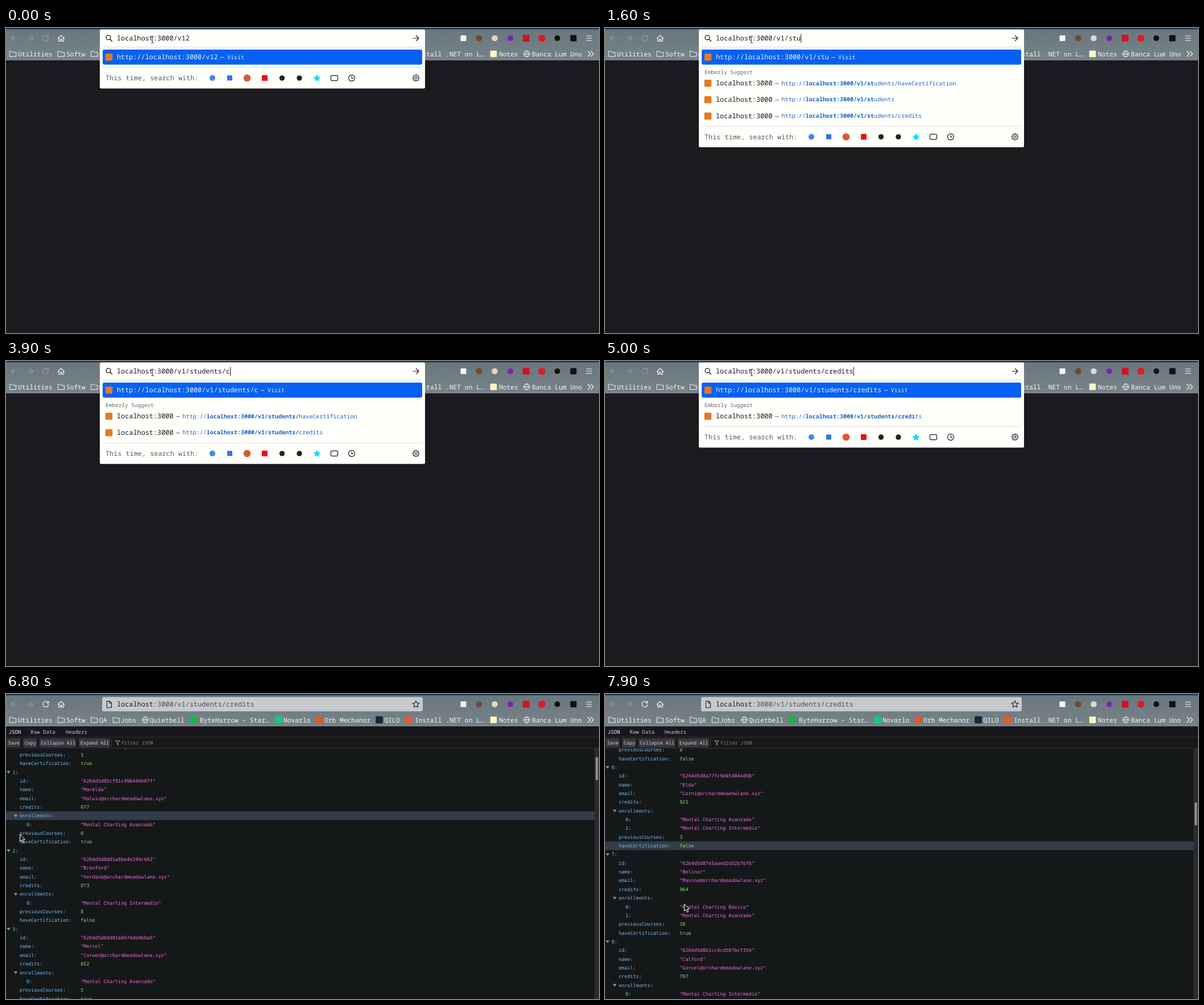
An HTML page for the animation above (8 s loop, 1043 px wide and 537 px high).

```html
<!DOCTYPE html>
<html lang="en">
<head>
<meta charset="utf-8">
<title>Browser address bar and JSON view</title>
<style>
  html, body { margin: 0; width: 100%; height: 100%; overflow: hidden; background: #1b1a1e; }
  svg { display: block; width: 100%; height: 100%; }
  text { font-family: "Noto Sans Mono", "DejaVu Sans Mono", monospace; white-space: pre; text-rendering: geometricPrecision; }
  .json text { font-family: "DejaVu Sans Mono", monospace; }
  .line { fill: none; stroke-linecap: round; stroke-linejoin: round; }
</style>
</head>
<body>
<svg id="stage" viewBox="0 0 1043 537" xmlns="http://www.w3.org/2000/svg"></svg>
<script>
const LOOP = 8000, ROW = 15.345, TOP = 103.8;
const PALE = "#f4f6f7", INK = "#1a1a1e";

// y is the middle of the capitals
const text = (x, y, s, size, fill, extra = "") =>
  `<text x="${x}" y="${y + size * 0.36}" font-size="${size}" fill="${fill}" ${extra}>${s}</text>`;
const rect = (x, y, w, h, fill, r = 0) =>
  `<rect x="${x}" y="${y}" width="${w}" height="${h}" rx="${r}" fill="${fill}"/>`;
const dot = (x, y, r, fill) => `<circle cx="${x}" cy="${y}" r="${r}" fill="${fill}"/>`;
const line = (d, stroke, w = 1.1) => `<path class="line" d="${d}" stroke="${stroke}" stroke-width="${w}"/>`;
const ring = (x, y, r, stroke, w = 1.1) =>
  `<circle class="line" cx="${x}" cy="${y}" r="${r}" stroke="${stroke}" stroke-width="${w}"/>`;
const box = (x, y, size, fill, r = 1) => rect(x - size / 2, y - size / 2, size, size, fill, r);

const folder = x => line(`M${x} 41h4l1.5 1.8h5.5v7.4h-11z`, PALE, 1);
const globe = x => ring(x, 45.5, 5.3, PALE, 1) +
  line(`M${x - 5.3} 45.5h10.6M${x} 40.2c-3.4 3-3.4 7.6 0 10.6c3.4-3 3.4-7.6 0-10.6`, PALE, 0.9);
const arrow = (x, y, dir, c) =>
  line(`M${x - 5 * dir} ${y}h${10 * dir}m${-4.5 * dir} -4.5l${4.5 * dir} 4.5l${-4.5 * dir} 4.5`, c, 1.2);

function star(x, y, r, inner = 0.48) {
  let d = "";
  for (let i = 0; i < 10; i++) {
    const a = i * Math.PI / 5 - Math.PI / 2, q = i % 2 ? r * inner : r;
    d += `${i ? "L" : "M"}${(x + q * Math.cos(a)).toFixed(2)} ${(y + q * Math.sin(a)).toFixed(2)}`;
  }
  return d + "Z";
}

function gear(x, y) {
  let d = "";
  for (let i = 0; i < 32; i++) {
    const a = i * Math.PI / 16, r = i % 4 < 2 ? 5.7 : 4.4;
    d += `${i ? "L" : "M"}${(x + r * Math.cos(a)).toFixed(2)} ${(y + r * Math.sin(a)).toFixed(2)}`;
  }
  return line(d + "Z", INK, 1.1) + ring(x, y, 1.9, INK);
}

function chrome() {
  const mark = [
    [164, "QA"], [202, "Jobs"], [21, "Utilities"], [106, "Softw"], [253, "Quietbell"],
    [341, "ByteHarrow – Star…"], [488, "Novarlo"], [560, "Orb Mechanor"], [665.5, "QILO"],
    [719, "Install .NET on L…"], [867, "Notes"], [925, "Banca Lum Uno"]
  ];
  return `<linearGradient id="bar" x2="0" y2="1"><stop stop-color="#69767e"/><stop offset="1" stop-color="#788388"/></linearGradient>` +
    rect(0, 0, 1043, 57, "url(#bar)") + rect(0, 0, 1043, 2.3, "#1d3549") +
    arrow(14.5, 18, -1, "#929ca1") + arrow(42.5, 18, 1, "#929ca1") +
    line("M91.5 18.5L97 13l5.5 5.5M93 17.5v6h2.7v-3.7h2.6v3.7h2.7v-6", PALE, 1.2) +
    box(804.5, 18, 10, PALE, 1) + dot(832, 18, 5.5, "#6f4a35") + dot(859.5, 18, 5.3, "#ddd8cc") +
    dot(887, 18, 5, "#7a23b8") + box(914.8, 18, 12, "#d0141f") + dot(942.5, 18, 6.3, "#dc1c24") +
    dot(969.7, 18, 5, "#111") + box(998, 18, 11, "#111") +
    line("M1021 14h9M1021 18h9M1021 22h9", PALE, 1.2) +
    [6.7, 91.7, 150, 188.7].map(folder).join("") + globe(245) + globe(916) +
    box(330, 45.5, 12, "#12b54a") + box(479.5, 45.5, 12, "#0fcf7c") + dot(551, 45.5, 6, "#ff4e12") +
    box(656.5, 45.5, 12.5, "#17223d") + box(708, 45.5, 12, "#f0562a") + box(857.5, 45.5, 11.5, "#fbf9c4") +
    line("M1023.5 41l4.5 4.5l-4.5 4.5M1029 41l4.5 4.5l-4.5 4.5", PALE, 1.2) +
    mark.map(([x, s]) => text(x, 45.5, s, 11.27, PALE)).join("");
}

const reload = c => line("M74.3 15.5a5 5 0 1 0 .5 3.5M74.8 12.8v3.2h-3.4", c, 1.2);

const closedBar = () =>
  rect(169, 5.5, 564, 25, "#c6cacc", 3) +
  line("M177.5 12.5h4.5l3.5 3.5v8h-8zM182 12.5v3.5h3.5", INK, 1.1) +
  text(195, 18, `localhost<tspan fill="#4b4f53">:3000/v1/students/credits</tspan>`, 11.85, INK) +
  line(star(721, 18.3, 6.2), INK, 1.1);

// Address panel
const URL_TEXT = "localhost:3000/v1/students/credits";
const ALL = ["explorers/amount/node", "students/haveCertification", "explorers/usernames/node",
  "explorers/stack/javascript", "explorers/java", "students", "explorers/node", "explorers/test", "fizzbuzz/1"];
const THREE = ["students/haveCertification", "students", "students/credits"];
const TWO = [THREE[0], THREE[2]], ONE = [THREE[2]];

// time, typed, shown in first row, bold, rows, caret, bold in later rows
const TYPING = [
  [0, 18, 18, 0, [], 0],
  [100, 17, 17, 17, [], 1], [200, 17, 17, 17, ALL, 1],
  [600, 18, 18, 18, ALL, 1], [900, 18, 18, 18, ALL, 0],
  [1200, 19, 19, 18, ALL, 1], [1300, 19, 19, 19, THREE, 1], [1400, 20, 20, 20, THREE, 1],
  [1600, 21, 21, 20, THREE, 1], [1700, 21, 21, 21, THREE, 1], [1800, 22, 22, 21, THREE, 1],
  [1900, 23, 23, 22, THREE, 1], [2000, 24, 24, 23, THREE, 1], [2100, 25, 25, 24, THREE, 1],
  [2200, 25, 25, 25, THREE, 1],
  [2500, 26, 25, 25, THREE, 1], [2600, 26, 26, 25, THREE, 1], [2700, 26, 26, 26, THREE, 1, 25],
  [3000, 27, 26, 26, THREE, 1], [3100, 27, 27, 26, THREE, 1], [3200, 27, 27, 27, TWO, 1, 26], [3300, 27, 27, 27, TWO, 1],
  [3700, 28, 27, 27, TWO, 1], [3900, 28, 28, 27, TWO, 1], [4000, 28, 28, 28, ONE, 1],
  [4200, 29, 29, 28, ONE, 1], [4300, 30, 30, 29, ONE, 1], [4400, 31, 31, 30, ONE, 1], [4500, 31, 31, 31, ONE, 1],
  [4700, 32, 32, 32, ONE, 1], [4900, 33, 33, 32, ONE, 1], [5000, 34, 34, 32, ONE, 1]
];

function suggestion(path, i, bold) {
  const y = 97 + 28.83 * i, url = "localhost:3000/v1/" + path;
  return box(181, y + 0.3, 12.5, "#e57a22", 1.5) + text(195, y, "localhost:3000", 11.85, INK) +
    text(299, y, "—", 11.85, "#555") +
    text(310.6, y, `http://<tspan font-weight="700">${url.slice(0, bold)}</tspan>${url.slice(bold)}`, 10.04, "#1763c6");
}

function searchRow(y) {
  return text(175, y, "This time, search with:", 11.85, "#5d5d62") +
    dot(363, y, 5, "#4285f4") + box(393.5, y, 9, "#2b78e4") + dot(424, y, 6.3, "#de5833") +
    box(455, y, 10, "#ee0f0f") + dot(485.5, y, 4.7, "#222") + dot(516, y, 4.7, "#222") +
    `<path d="${star(547, y + 0.4, 6.6, 0.52)}" fill="#0fdcf8"/>` +
    `<rect class="line" x="571.5" y="${y - 4.5}" width="12" height="9" rx="1.5" stroke="${INK}" stroke-width="1.2"/>` +
    ring(608, y, 5.5, INK, 1.2) + line(`M608 ${y - 3.2}v3.5h2.6`, INK, 1.1) + gear(721, y);
}

function panel([time, typed, shown, bold, rows, caret, later = bold]) {
  const bottom = rows.length ? 123.7 + 28.77 * rows.length : 106.5;
  const cut = n => time ? URL_TEXT.slice(0, n) : URL_TEXT.slice(0, 17) + "2";
  const end = 195 + 7.11 * (shown + 7);
  return rect(165, 2.5, 572, bottom - 2.5, "#fffffc", 2.5) +
    ring(180, 16.8, 3.9, INK, 1.3) + line("M183 19.8l3.4 3.4", INK, 1.4) + arrow(721, 18, 1, INK) +
    text(195, 18, cut(typed), 11.85, INK) +
    (caret ? rect(195 + 7.11 * typed, 10.5, 1, 15.5, "#111") : "") +
    rect(170, 33, 562, 1, "#dedede") + rect(170, 38, 562, 26.5, "#0561f3", 3) +
    box(181, 51.3, 12.5, "#e57a22", 1.5) + text(195, 51, "http://" + cut(shown), 11.85, "#eaf4ff") +
    text(end + 4, 51, "—", 11.85, "#cfe2ff") + text(end + 16.2, 51, "Visit", 10.04, "#eaf4ff") +
    (rows.length ? text(175, 77.3, "Emberly Suggest", 9.45, "#66666b") : "") +
    rows.map((p, i) => suggestion(p, i, i ? later : bold)).join("") +
    rect(170, bottom - 37.5, 562, 1, "#dedede") + searchRow(bottom - 18.4);
}

// JSON page: id, name, mailbox, credits, courses, previous, certified
const LEVEL = { b: "Básico", i: "Intermedio", a: "Avanzado" };
const STUDENTS = [
  ["9f1df827eb84bb23", "Dalven", "Ferl", 508, "ia", 1, true],
  ["5cf81c496446b67f", "Marelda", "Halwin", 677, "a", 6, true],
  ["dd1a0be4e249c662", "Brenford", "Verdano", 973, "i", 8, false],
  ["dd01ab97ddedbba5", "Mercel", "Corwen", 652, "a", 5, true],
  ["3be07c19ad52f4e8", "Odrina", "Selwyk", 815, "ba", 2, true],
  ["c41f6ea0927bd35c", "Tervin", "Maldor", 590, "bi", 8, false],
  ["a77fc9d454044d98", "Elda", "Lorni", 921, "ai", 3, false],
  ["7e5aaed2d52b7bf6", "Belinor", "Mavine", 964, "ba", 10, true],
  ["b1cc4cd567bcf354", "Calford", "Gorvel", 707, "i", 4, true]
];

function jsonRows() {
  let out = "", row = 0;
  const add = (x, key, value, open) => {
    const y = TOP + ROW * row++;
    out += text(x, y, key + ":", 8.42, "#75bbf5");
    if (open) out += `<path d="M${x - 10.5} ${y - 2}h7l-3.5 4.6z" fill="#8f9094"/>`;
    if (value !== undefined) {
      const str = typeof value === "string";
      out += text(131.3, y, str ? `"${value}"` : value, 8.42, str ? "#ee6bdc" : "#86de74");
    }
  };
  STUDENTS.forEach(([id, name, mail, credits, courses, previous, certified], i) => {
    add(11.5, i, undefined, true);
    add(24, "id", "6264d5d8" + id);
    add(24, "name", name);
    add(24, "email", mail + "@orchardmeadowlane.xyz");
    add(24, "credits", credits);
    add(24, "enrollments", undefined, true);
    [...courses].forEach((c, k) => add(36, k, "Mental Charting " + LEVEL[c]));
    add(24, "previousCourses", previous);
    add(24, "haveCertification", certified);
  });
  return out;
}

function page() {
  const button = (x, w, s) => rect(x, 78, w, 16, "#38383d", 1) + text(x + 2.8, 86, s, 8.43, "#d4d4d8");
  return rect(0, 57, 1043, 480, "#151818") + rect(0, 57, 1043, 39, "#18181a") +
    rect(0, 75.5, 1043, 1, "#303034") + rect(0, 95, 1043, 1, "#303034") +
    text(4.6, 66.7, "JSON", 9.1, "#fff") + text(43.3, 66.7, "Raw Data", 9.1, "#c4c4c8") +
    text(104.8, 66.7, "Headers", 9.1, "#c4c4c8") +
    button(1, 24.5, "Save") + button(30, 24.5, "Copy") + button(58.5, 65, "Collapse All") + button(128, 55, "Expand All") +
    rect(185, 79, 1, 14, "#3c3c40") + line("M192.8 82.5h7.4l-2.8 3.5v4l-1.8-1.4v-2.6z", "#a0a0a4", 1) +
    text(203, 86, "Filter JSON", 8.43, "#86868b") +
    `<clipPath id="view"><rect y="96" width="1043" height="441"/></clipPath>
     <g class="json" clip-path="url(#view)"><g id="scroll"><rect id="hover" width="1035" height="${ROW}" fill="#353b48"/>${jsonRows()}</g></g>` +
    rect(1035, 96, 8, 441, "#2a2a2f") + `<rect id="thumb" x="1037" y="98" width="4.5" height="41" rx="2" fill="#8b8b90"/>`;
}

// time, scroll, scroll at last hover check (-1: none), pointer x, y
const POINTER = [
  [5900, 0, -1, 172, 36], [6000, 0, -1, 96, 61], [6100, 0, -1, -50, 0],
  [6300, 0, 0, 13, 243], [6500, 0, 0, 24.5, 247],
  [6700, 87, 0, 24.5, 247], [6800, 119.7, 87, 24.5, 247], [6900, 200, 119.7, 24.5, 247],
  [7000, 285, 200, 24.5, 247], [7100, 350, 285, 24.5, 247], [7200, 390, 350, 24.5, 247],
  [7400, 430, 390, 60, 290], [7500, 500, 430, 108, 342], [7600, 585, 500, 139.5, 369.5],
  [7700, 662, 585, 139.5, 369.5], [7800, 746, 662, 139.5, 369.5], [7900, 849.5, 746, 139.5, 369.5]
];

const $ = id => document.getElementById(id);
$("stage").innerHTML = rect(0, 0, 1043, 537, "#1b1a1e") + chrome() +
  `<g id="dim">${reload("#929ca1")}</g><g id="lit">${reload(PALE)}</g>
   <g id="closed">${closedBar()}</g><g id="page">${page()}</g><g id="panel"></g>
   <g id="beam">${line("M255.8 14.5h1.4l.6.7l.6-.7h1.4M257.8 15v10.5M255.8 26h1.4l.6-.7l.6.7h1.4", "#fff", 1.8)}${line("M255.8 14.5h1.4l.6.7l.6-.7h1.4M257.8 15v10.5M255.8 26h1.4l.6-.7l.6.7h1.4", "#222", 1)}</g>
   <path id="arrow" d="M0 0V12.6L2.9 10L5 14.7L7.2 13.7L5.1 9.2H9Z" fill="#18181a" stroke="#fff" stroke-width="1"/>`;

const at = (table, t) => table.findLast(s => s[0] <= t);
const show = (id, on) => $(id).setAttribute("visibility", on ? "visible" : "hidden");
let last;

function draw(t) {
  const open = t < 5200, step = at(TYPING, t);
  if (step !== last) $("panel").innerHTML = panel(last = step);
  show("panel", open);
  show("closed", !open);
  show("dim", t < 5300);
  show("lit", t >= 5300);
  $("page").style.display = t >= 5700 ? "" : "none";

  const [, scroll, seen, x, y] = at(POINTER, t) || [0, 0, -1, -50, 0];
  show("beam", t < 5900);
  $("arrow").setAttribute("transform", `translate(${x} ${y})`);
  $("scroll").setAttribute("transform", `translate(0 ${-scroll})`);
  $("thumb").setAttribute("y", 98 + scroll * 0.109);
  const first = TOP - ROW / 2, row = Math.floor((y + seen - first) / ROW);
  $("hover").setAttribute("y", seen < 0 ? -100 : first + row * ROW);
}

const start = performance.now();
function tick() {
  draw((performance.now() - start) % LOOP);
  requestAnimationFrame(tick);
}
tick();
</script>
</body>
</html>
```
